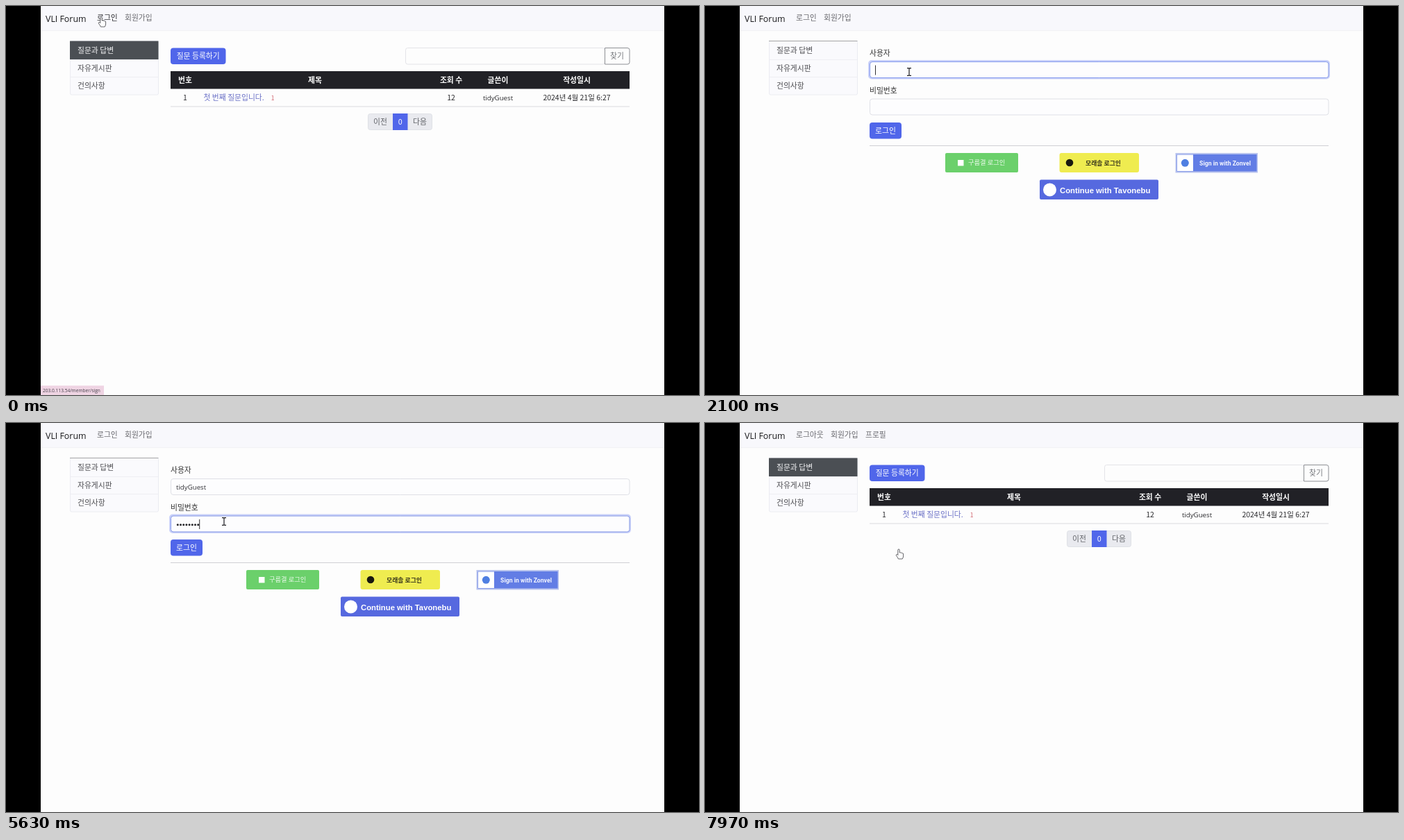
These frames come from a looping animation (998 by 561 pixels, 8000 ms). An HTML page with a canvas:

```html
<!DOCTYPE html>
<html lang="ko">
<head>
<meta charset="utf-8">
<title>Board login</title>
<style>
html, body { margin: 0; width: 100%; height: 100%; overflow: hidden; background: #000; }
canvas { display: block; }
</style>
</head>
<body>
<canvas id="stage" width="998" height="561"></canvas>
<script>
const ctx = document.getElementById('stage').getContext('2d');
const LOOP = 8000;
const KR = '"Noto Sans CJK KR", "Noto Sans CJK", sans-serif';
const LATIN = '"Open Sans", "Noto Sans CJK KR", sans-serif';
const BLUE = '#5066ea';
const USER = 'tidyGuest';

// Moments of the story, in ms
const LOGIN_PAGE = 30, FOCUS_USER = 1630, TYPE_USER = 2440, KEY_GAP = 60;
const FOCUS_PASS = 3230, PRESS = 7430, HOME_PAGE = 7970;
const PASS_KEYS = [4700, 4770, 4870, 5230, 5260, 5300, 5330, 5370];

// Pointer hot spot: time, x, y
const PATH = [
  [0, 137, 17], [470, 137, 17], [730, 171, 48], [1270, 290, 101],
  [1300, 290, 101], [1470, 286, 100], [1630, 286, 100], [2000, 294, 95],
  [2850, 294, 95], [3200, 299, 146], [4100, 299, 146], [4400, 314, 142],
  [6500, 314, 142], [6830, 308, 178], [7270, 279, 183], [LOOP, 279, 183]
];

const clamp = v => Math.max(0, Math.min(1, v));
const ramp = (t, start, length) => clamp((t - start) / length);

function box(x, y, w, h, fill, stroke, r = 0) {
  ctx.beginPath();
  ctx.roundRect(x, y, w, h, r);
  if (fill) { ctx.fillStyle = fill; ctx.fill(); }
  if (stroke) { ctx.strokeStyle = stroke; ctx.lineWidth = 1; ctx.stroke(); }
}

function disc(x, y, r, fill) {
  ctx.beginPath();
  ctx.arc(x, y, r, 0, 7);
  ctx.fillStyle = fill;
  ctx.fill();
}

// y is the visual middle of the line
function text(str, x, y, { size = 10.8, color = '#333', weight = 400, align = 'left', font = KR } = {}) {
  ctx.font = `${weight} ${size}px ${font}`;
  ctx.textAlign = align;
  ctx.fillStyle = color;
  ctx.fillText(str, x, y + size * 0.37);
}

function pointer(t) {
  const i = Math.max(1, PATH.findIndex(p => p[0] > t));
  const [t0, x0, y0] = PATH[i - 1], [t1, x1, y1] = PATH[i];
  const k = (t - t0) / (t1 - t0);
  return { x: x0 + (x1 - x0) * k, y: y0 + (y1 - y0) * k };
}

const inside = (p, x, y, w, h) => p.x >= x && p.x <= x + w && p.y >= y && p.y <= y + h;

function navbar(items, hover) {
  box(50, 0, 898, 35.5, '#f8f8fc');
  box(50, 35, 898, 1, '#f1f1f5');
  text('VLI Forum', 57, 18.5, { size: 12.4, color: '#18181b', font: LATIN });
  let x = 131;
  items.forEach((item, i) => {
    text(item, x, 17.5, { color: i === 0 && hover ? '#303034' : '#69696e' });
    x += item.length * 10 + 10;
  });
}

function sidebar(active) {
  box(92.5, 50.5, 127, 77.5, '#fafafd', '#ebecf1', 2);
  box(93, 77, 126, 1, '#eeeef3');
  box(93, 102, 126, 1, '#eeeef3');
  if (active) box(92, 50.5, 127.5, 26.5, '#4b4f54');
  else box(92, 50, 127.5, 1, '#a3a3a5');
  ['질문과 답변', '자유게시판', '건의사항'].forEach((item, i) =>
    text(item, 103, 64.3 + i * 25.6, { color: active && i === 0 ? '#f4f4f6' : '#4c4c50' }));
}

function listPage() {
  sidebar(true);
  box(237, 60.5, 79.5, 23.5, BLUE, null, 4);
  text('질문 등록하기', 276.7, 72.5, { color: '#fff', align: 'center' });

  box(575.5, 60.5, 287, 23.5, '#fdfdfd', '#e4e4e8', 3);
  box(862.5, 60.5, 35.5, 23.5, '#fdfdfd', '#8d8f94', [0, 3, 3, 0]);
  text('찾기', 880, 72.5, { color: '#74767b', align: 'center' });

  box(237, 94, 661, 25.5, '#212126');
  const columns = [
    ['번호', 258, '1'], ['제목', 445], ['조회 수', 641, '12'],
    ['글쓴이', 708.5, USER], ['작성일시', 822, '2024년 4월 21일 6:27']
  ];
  for (const [head, x, value] of columns) {
    text(head, x, 107, { color: '#fff', weight: 700, align: 'center' });
    if (!value) continue;
    const latin = value === USER;
    text(value, x, 132.5, {
      size: latin ? 9.7 : 10.5, color: '#2b2b2e', align: 'center', font: latin ? LATIN : KR
    });
  }
  text('첫 번째 질문입니다.', 284.5, 132.5, { color: '#6a70c6' });
  text('1', 384, 133, { size: 8.5, color: '#d0606c', align: 'center' });
  box(237, 144.5, 661, 1, '#dcdce0');

  box(521.5, 155.5, 92, 23, '#e9eaef', '#dfe1e6', 3);
  box(557, 155, 21.5, 24, BLUE);
  text('이전', 539, 167.3, { color: '#626469', align: 'center' });
  text('0', 567.7, 167.3, { color: '#fff', align: 'center' });
  text('다음', 596, 167.3, { color: '#626469', align: 'center' });
}

function field(y, focus) {
  if (focus > 0) box(235, y - 2, 665, 27.5, `rgba(88, 112, 238, ${0.32 * focus})`, null, 5);
  box(237.5, y + 0.5, 660.5, 23, '#fdfdfe', '#dfe0e6', 3.5);
  if (focus > 0) box(237.5, y + 0.5, 660.5, 23, null, `rgba(134, 155, 238, ${focus})`, 3.5);
}

const caret = (x, y) => box(x, y - 7, 1, 14, '#303034');

function socialButtons() {
  box(346, 212, 105, 28, '#6bd06b', null, 2);
  box(364, 222, 8.5, 8.5, '#fff');
  text('구름결 로그인', 379, 226, { size: 9.3, color: '#edfaed' });

  box(510.5, 212, 114.5, 28, '#efec50', null, 3);
  disc(525, 226, 5.3, '#18180f');
  text('모래솔 로그인', 573.5, 226.3, { size: 8.9, color: '#38361c', weight: 700, align: 'center' });

  box(677.5, 212, 118.5, 28.5, '#b7c2ee');
  box(679.5, 214, 115, 24.5, '#627de5');
  box(680, 214.5, 23, 23.5, '#fff');
  disc(691.3, 226.3, 5.5, '#4f7fe2');
  text('Sign in with Zonvel', 749, 226.5, {
    size: 8.7, color: '#f4f6ff', weight: 700, align: 'center', font: 'Roboto, sans-serif'
  });

  box(482, 250.5, 171, 28.5, '#5669df', null, 2);
  disc(496.5, 265, 9.5, '#fff');
  text('Continue with Tavonebu', 511, 265.5, {
    size: 11.3, color: '#fff', weight: 700, font: '"Liberation Sans", sans-serif'
  });
}

function loginPage(t) {
  sidebar(false);
  const userFocus = ramp(t, FOCUS_USER, 150) - ramp(t, FOCUS_PASS, 150);
  const passFocus = ramp(t, FOCUS_PASS, 150) - ramp(t, PRESS, 150);
  const pressed = ramp(t, PRESS, 150);

  text('사용자', 237, 68.3);
  field(80, userFocus);
  const typed = USER.slice(0, Math.max(0, Math.floor((t - TYPE_USER) / KEY_GAP) + 1));
  text(typed, 245, 92.7, { size: 9.7, color: '#333338', font: LATIN });
  if (t >= FOCUS_USER && t < FOCUS_PASS) caret(245 + ctx.measureText(typed).width, 92.5);

  text('비밀번호', 237, 121.8);
  field(133.5, passFocus);
  const dots = PASS_KEYS.filter(key => t >= key).length;
  for (let i = 0; i < dots; i++) disc(247.3 + i * 4.2, 146.8, 1.5, '#26262a');
  const blinkOff = t >= 6270 && t < 6800;
  if (t >= FOCUS_PASS && t < PRESS && !blinkOff) caret(245 + dots * 4.15, 146);

  if (pressed) box(234.5, 165.5, 51, 28.5, `rgba(80, 102, 234, ${0.4 * pressed})`, null, 6);
  box(237, 168, 46, 23.5, pressed ? '#4459d2' : BLUE, null, 4);
  text('로그인', 260, 180, { color: '#fff', align: 'center' });
  box(237, 201, 661, 1, '#cfcfd4');
  socialButtons();
}

function linkStatus(t) {
  ctx.globalAlpha = t < 1270 ? 1 - 0.96 * ramp(t, 500, 220) : 0;
  box(50, 547.5, 91, 13.5, '#efd4e3');
  text('203.0.113.54/member/sign', 53, 554.8, { size: 6.6, color: '#45404a', font: LATIN });
  ctx.globalAlpha = 1;
}

const ARROW = new Path2D('M0 0V10.2L2.4 8L4.1 11.8L5.8 11L4.2 7.4H7.2Z');
const HAND = new Path2D('M-1.2 6V0.2Q-1.2-1 0-1T1.2 .2V4Q2.3 3.2 3.2 4.3Q4.4 3.6 5.1 4.8' +
  'Q6.6 4.6 6.6 6V9Q6.6 11 5.2 13H-.6Q-1.2 11-3.6 8.2Q-4.2 6.8-2.8 6.4Q-2 6.2-1.2 7.6Z');
const BEAM = new Path2D('M-3-5.3H-1Q0-5.3 0-4.5Q0-5.3 1-5.3H3M0-4.5V4.5M-3 5.3H-1Q0 5.3 0 4.5Q0 5.3 1 5.3H3');

function drawPointer(t, p) {
  const onField = inside(p, 237, 80, 661, 24) || inside(p, 237, 134, 661, 24);
  const onLink = inside(p, 126, 8, 40, 20) || inside(p, 92, 51, 128, 77) || inside(p, 237, 168, 46, 23);
  ctx.save();
  ctx.translate(p.x, p.y);
  ctx.lineJoin = 'round';
  if (onField) {
    ctx.strokeStyle = '#1c1c20';
    ctx.lineWidth = 1.2;
    ctx.stroke(BEAM);
  } else {
    const shape = onLink ? HAND : ARROW;
    ctx.fillStyle = '#fdfdfd';
    ctx.strokeStyle = '#55555a';
    ctx.lineWidth = 0.9;
    ctx.fill(shape);
    ctx.stroke(shape);
  }
  ctx.restore();
}

function draw(t) {
  box(0, 0, 998, 561, '#000');
  box(50, 0, 898, 561, '#fdfdfd');
  const p = pointer(t);
  const member = t >= HOME_PAGE;
  navbar(member ? ['로그아웃', '회원가입', '프로필'] : ['로그인', '회원가입'], inside(p, 126, 8, 40, 20));
  if (t < LOGIN_PAGE || member) listPage();
  else loginPage(t);
  linkStatus(t);
  drawPointer(t, p);
}

const start = performance.now();
function tick() {
  draw((performance.now() - start) % LOOP);
  requestAnimationFrame(tick);
}
tick();
</script>
</body>
</html>
```
